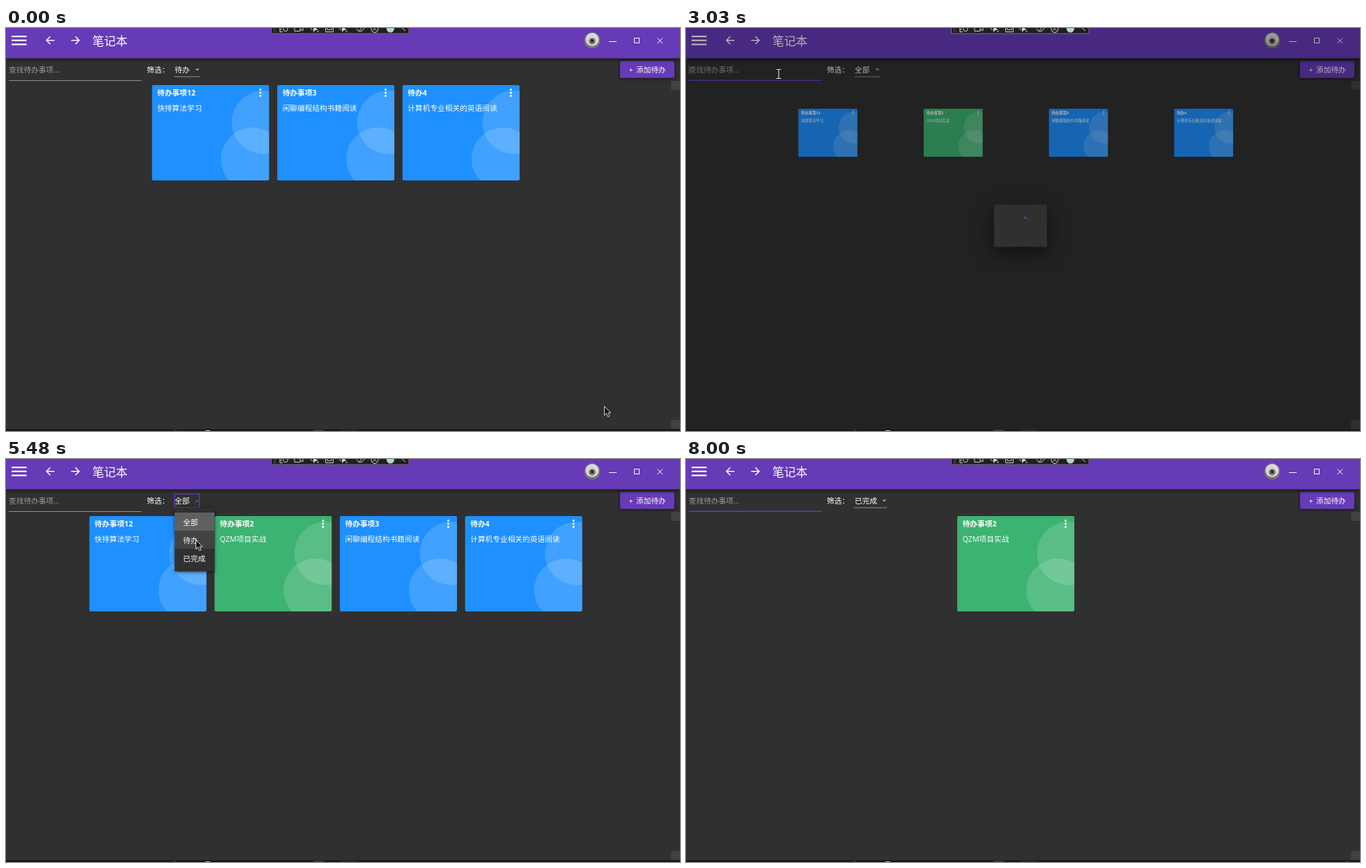
An HTML page with a canvas for the animation above (8.07 s loop, 967 px wide and 579 px high).

```html
<!DOCTYPE html>
<html lang="zh-CN">
<head>
<meta charset="utf-8">
<title>笔记本</title>
<style>
html, body { margin: 0; width: 100%; height: 100%; overflow: hidden; background: #303030; }
canvas { display: block; }
</style>
</head>
<body>
<canvas id="stage" width="967" height="579"></canvas>
<script>
const ctx = document.getElementById('stage').getContext('2d');
const LOOP = 8070, W = 967;
const PURPLE = '#673ab7', PAPER = '#303030', BLUE = '#1e90ff', GREEN = '#3cb371';
const FONT = '"Open Sans", "Noto Sans CJK SC", "Noto Sans CJK", sans-serif';
const OPTIONS = ['全部', '待办', '已完成'];
const TODOS = [
  { title: '待办事项12', text: '快排算法学习' },
  { title: '待办事项2', text: 'QZM项目实战', done: true },
  { title: '待办事项3', text: '闲聊编程结构书籍阅读' },
  { title: '待办4', text: '计算机专业相关的英语阅读' }
];
const FIRST_QUERY = 3030, SECOND_QUERY = 6940;

// Popup: opening time, closing time, option selected while open
const POPUPS = [[980, 1520, 1], [4200, 5830, 0]];
// Search field: focus time, blur time
const FOCUS = [[2250, 4200], [6540, LOOP]];
// Pointer: time, x, y
const POINTER = [
  [70, 858, 543], [710, 255, 62], [980, 255, 62], [1380, 284, 91], [1520, 284, 91],
  [2000, 150, 69], [2200, 150, 69], [2500, 133, 66], [3060, 133, 66], [3630, 304, 123],
  [3770, 285, 100], [3850, 285, 100], [4130, 255, 62], [4250, 255, 62], [4590, 275, 93],
  [4660, 275, 93], [4960, 270, 141], [5270, 274, 93], [5410, 274, 93], [5480, 272, 116],
  [5690, 270, 143], [5830, 270, 143], [6480, 150, 60], [6980, 150, 60], [7600, 948, 578]
];

const clamp = v => Math.max(0, Math.min(1, v));
const smooth = v => v * v * (3 - 2 * v);

function rect(x, y, w, h, color, radius = 0) {
  ctx.fillStyle = color;
  ctx.beginPath();
  ctx.roundRect(x, y, w, h, radius);
  ctx.fill();
}

function disc(x, y, r, color) {
  ctx.fillStyle = color;
  ctx.beginPath();
  ctx.arc(x, y, r, 0, 7);
  ctx.fill();
}

function stroke(path, color = '#fff', width = 1) {
  ctx.strokeStyle = color;
  ctx.lineWidth = width;
  ctx.stroke(new Path2D(path));
}

function fillPath(path, color) {
  ctx.fillStyle = color;
  ctx.fill(new Path2D(path));
}

function label(text, x, middle, color = '#fff', size = 10.7, weight = 400) {
  ctx.font = `${weight} ${size}px ${FONT}`;
  ctx.fillStyle = color;
  ctx.fillText(text, x, middle + size * 0.38);
}

function shadowed(blur, offset, draw, color = 'rgba(0,0,0,.6)') {
  ctx.save();
  ctx.shadowColor = color;
  ctx.shadowBlur = blur;
  ctx.shadowOffsetY = offset;
  draw();
  ctx.restore();
}

function pointerAt(t) {
  const i = POINTER.findIndex(p => p[0] > t);
  if (i === 0) return POINTER[0].slice(1);
  if (i < 0) return POINTER.at(-1).slice(1);
  const [t0, x0, y0] = POINTER[i - 1], [t1, x1, y1] = POINTER[i];
  const k = smooth((t - t0) / (t1 - t0));
  return [x0 + (x1 - x0) * k, y0 + (y1 - y0) * k];
}

function drawHeader() {
  shadowed(6, 1, () => rect(0, 0, W, 43.5, PURPLE));
  for (const y of [11, 16.7, 22.5]) rect(8, y, 21.5, 2.2, '#fff');
  stroke('M69.5 17.8H58.5M63.5 12.3L58 17.8L63.5 23.3', '#fff', 1.5);
  stroke('M93.5 17.8H104.5M99.5 12.3L105 17.8L99.5 23.3', '#fff', 1.5);
  label('笔记本', 124, 18.5, '#fff', 16.8);
  stroke('M865 19.5H876M901.5 14.5H908.5V21.5H901.5ZM934.5 14.5L942 22M942 14.5L934.5 22');

  disc(841, 17.8, 11.5, '#777579');
  disc(841, 16.5, 9.5, '#d9d8d6');
  disc(841, 19, 5, '#85817e');
  disc(841, 18.5, 2.4, '#272526');
}

function drawToolbar() {
  rect(380, -2, 198.5, 10.5, '#737373');
  rect(381, -2, 196.5, 9.5, '#1f1f1f');
  ctx.save();
  ctx.beginPath();
  ctx.rect(381, 0, 196, 7);
  ctx.clip();
  for (let i = 0; i < 6; i++) rect(384 + i % 2 * 2, (i >> 1) * 2 + 1, 1, 1, '#666');
  const ink = '#d0d0d0';
  stroke('M393 0V5.5H397M393 2H396M414 0V4.5H422V0M422 2L426 4V0', ink);
  stroke('M458.5 -2V5.5H469.5V-2M461 0V2.5H467V0', ink);
  stroke('M503 1L506 5L510 0M507 5L511 4L514 0M566 -2L573 4', ink);
  for (const x of [443, 484]) {
    fillPath(`M${x - 2} -3V6L${x + 1} 3H${x + 5}Z`, ink);
    stroke(`M${x - 6} 1L${x - 3} 3M${x + 3} 5H${x + 6}`, ink);
  }
  for (const [x, r] of [[401, 3.2], [529, 5]]) {
    ctx.strokeStyle = ink;
    ctx.beginPath();
    ctx.arc(x, 1.5, r, 0, 7);
    ctx.stroke();
  }
  stroke('M526 4L529 1L532 4', ink);
  disc(551.5, 1, 5.5, '#b5d8bd');
  ctx.restore();
}

function drawFilterBar(t, value, popup, focus) {
  label('查找待办事项...', 4, 60, '#9b9b9b');
  rect(4, 75, 190.5, 1, '#919191');
  if (focus) {
    const w = 190.5 * smooth(clamp((t - focus[0]) / 130));
    rect(99.25 - w / 2, 74.5, w, 1.5, PURPLE);
    if (t < 7800) rect(4, 53.5, 1, 12.5, '#7a4bcb');
  }

  label('筛选：', 202, 60);
  const right = value === 2 ? 288 : 278;
  const comboFocused = POPUPS.some(([open, close], i) => t >= open && t < FOCUS[i][0]);
  label(OPTIONS[value], 242, 60);
  if (popup) {
    ctx.strokeStyle = PURPLE;
    ctx.lineWidth = 1.3;
    ctx.strokeRect(241.7, 50.2, 35.6, 19.6);
    fillPath(`M${right - 7} 61.5h6l-3 -3z`, PURPLE);
  } else {
    rect(241, 69.5, right - 241, 1, comboFocused ? PURPLE : '#919191');
    fillPath(`M${right - 6.5} 58.5h6l-3 3z`, '#a0a0a0');
  }

  shadowed(4, 1, () => rect(881, 47.5, 78, 24.3, PURPLE, 2));
  label('+', 893.5, 60);
  label('添加待办', 904, 60);
}

function drawCard(todo, x, scale) {
  const w = 168, h = 137;
  ctx.save();
  ctx.translate(x + w / 2, 82 + h / 2);
  ctx.scale(scale, scale);
  ctx.translate(-w / 2, -h / 2);
  rect(0, 0, w, h, todo.done ? GREEN : BLUE, 2);
  ctx.save();
  ctx.clip();
  disc(160, 53.5, 45.5, 'rgba(255,255,255,.15)');
  disc(144.5, 106.5, 45.5, 'rgba(255,255,255,.15)');
  ctx.restore();
  label(todo.title, 7.5, 11, '#fff', 10.7, 700);
  label(todo.text, 7.5, 33);
  for (const y of [6.5, 11, 15.5]) disc(155.5, y, 1.5, '#fff');
  ctx.restore();
}

function drawCards(t) {
  const query = t >= SECOND_QUERY ? SECOND_QUERY : t >= FIRST_QUERY ? FIRST_QUERY : null;
  const list = query === SECOND_QUERY ? TODOS.filter(d => d.done)
    : query ? TODOS : TODOS.filter(d => !d.done);
  // Cards are already half expanded when a query result appears
  const scale = query ? Math.sin(Math.PI / 2 * clamp(1 / 3 + (t - query) / 400)) : 1;
  const left = 479 - list.length * 179.7 / 2;
  list.forEach((todo, i) => drawCard(todo, left + i * 179.7, scale));
}

function drawScrollButtons() {
  for (const [y, d] of [[76, -1], [563, 1]]) {
    rect(954, y, 13, 13, '#414141');
    fillPath(`M958 ${y + 6.5 - d}h5l-2.5 ${2.5 * d}z`, '#4d4d4d');
  }
}

function drawPopup(t, [open, close, selected], pointerY) {
  const grow = smooth(clamp((t - open) / 180));
  ctx.save();
  ctx.globalAlpha = grow * (1 - clamp((t - close) / 160));
  ctx.translate(0, 70);
  ctx.scale(1, 0.4 + 0.6 * grow);
  ctx.translate(0, -70);
  shadowed(5, 1, () => rect(242, 70.5, 57, 91, PAPER, 2));
  const hover = Math.floor((pointerY - 77) / 26);
  OPTIONS.forEach((option, i) => {
    const y = 77 + i * 26;
    if (i === selected) rect(242, y, 57, 26, '#606060');
    else if (i === hover) rect(242, y, 57, 26, '#434343');
    label(option, 254, y + 13.5);
  });
  ctx.restore();
}

function drawLoading(elapsed) {
  if (elapsed < 0 || elapsed > 350) return;
  const strength = 1 - smooth(elapsed / 350);
  rect(0, 0, W, 576, `rgba(0,0,0,${0.3 * strength})`);
  ctx.save();
  ctx.globalAlpha = strength;
  ctx.translate(480, 284);
  ctx.scale(0.5 + 0.5 * strength, 0.5 + 0.5 * strength);
  shadowed(28, 8, () => rect(-38, -30.5, 76, 61, PAPER, 2));
  ctx.strokeStyle = PURPLE;
  ctx.lineWidth = 2;
  ctx.beginPath();
  ctx.arc(0, 0, 13.5, -1.18 + elapsed / 250, -0.83 + elapsed / 120);
  ctx.stroke();
  ctx.restore();
}

function drawBottomEdge() {
  rect(0, 576.5, W, 2.5, '#1c1517');
  rect(240, 577, 5, 2, '#343033');
  rect(286, 578, 7, 1, '#bbb');
  rect(441, 577, 15, 2, '#3b383a');
  rect(480, 577, 25, 2, '#2a2426');
}

function drawPointer(x, y) {
  if (x < 194 && y > 46 && y < 75) {
    const beam = `M${x - 3.5} ${y - 6.5}h2.5q1 0 1 1v11q0 1 -1 1h-2.5M${x + 3.5} ${y - 6.5}h-2.5q-1 0 -1 1v11q0 1 1 1h2.5`;
    stroke(beam, '#111', 2.4);
    stroke(beam, '#eee', 1.1);
    return;
  }
  const arrow = `M${x + .5} ${y + .5}v13l3 -2.9l2.1 5l2.3 -1l-2.1 -4.8h4.1z`;
  fillPath(arrow, '#111');
  stroke(arrow, '#e8e8e8', 0.9);
}

function render(t) {
  const [x, y] = pointerAt(t);
  const popup = POPUPS.find(([open, close]) => t >= open && t < close + 160);
  const focus = FOCUS.find(([start, end]) => t >= start && t < end);
  const value = t < 1520 ? 1 : t < 5830 ? 0 : 2;

  rect(0, 0, W, 579, PAPER);
  drawCards(t);
  drawFilterBar(t, value, popup && t < popup[1], focus);
  drawScrollButtons();
  drawHeader();
  drawLoading(t - FIRST_QUERY);
  drawLoading(t - SECOND_QUERY);
  if (popup) drawPopup(t, popup, y);
  drawBottomEdge();
  drawToolbar();
  drawPointer(x, y);
}

const start = performance.now();
function tick() {
  render((performance.now() - start) % LOOP);
  requestAnimationFrame(tick);
}
tick();
</script>
</body>
</html>
```
